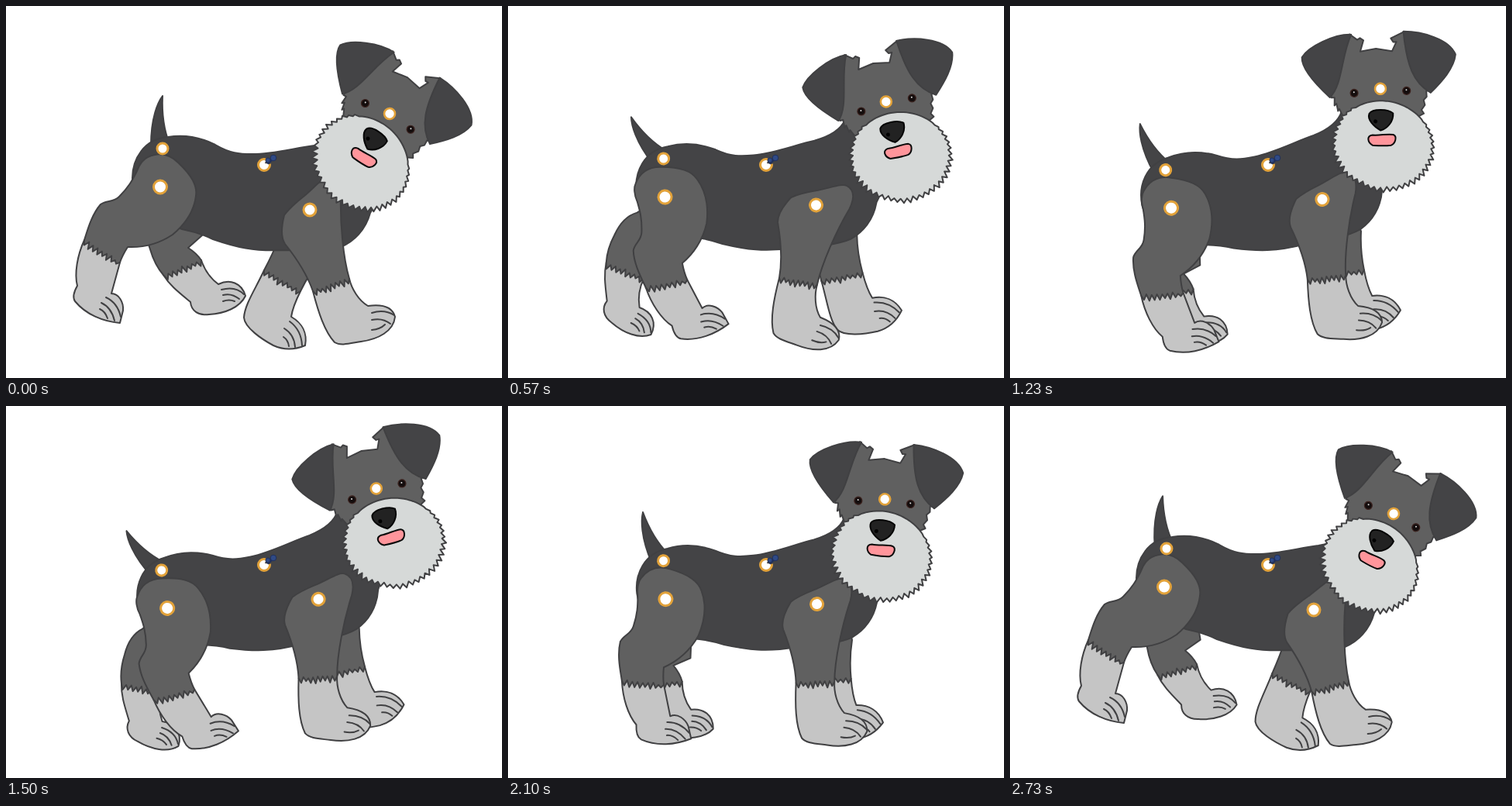
Recreate the animation shown at these times as an HTML page. Size 640 px wide and 480 px high, loop 2760 ms.

```html
<!DOCTYPE html>
<html lang="en">
<head>
<meta charset="utf-8">
<title>Walking puppet dog</title>
<style>
  html, body { margin: 0; width: 100%; height: 100%; overflow: hidden; background: #fff; }
  svg { display: block; width: 640px; height: 480px; }
  .line { stroke: #404042; stroke-width: 2; stroke-linejoin: round; stroke-linecap: round; }
  .dark { fill: #444446; }
  .coat { fill: #606060; }
  .paw { fill: #c5c5c5; }
  .beard { fill: #d6d9d8; }
  .none { fill: none; }
  .pin { fill: #fff; stroke: #e2a23a; stroke-width: 3; }
</style>
</head>
<body>
<svg viewBox="0 0 640 480">
  <g id="dog">
    <g id="hindFar"></g>
    <g id="foreFar"></g>
    <path id="tail" class="dark line" d="M202 116C196 124 187 144 187 180L198 192L211 178C203 158 201 138 202 116Z"/>
    <path class="dark line" d="M163 222C163 198 178 171 209 169C232 165 252 170 270 179C289 190 301 191 318 191C345 191 373 183 398 180C421 176 434 168 440 157L488 205C486 235 478 255 470 267C464 289 449 304 432 311C414 317 385 316 358 315C320 317 296 311 267 301Q248 292 227 288C190 275 163 250 163 222Z"/>
    <g id="hindNear"></g>
    <g id="foreNear"></g>
    <circle class="pin" cx="202" cy="184" r="7"/>
    <circle class="pin" cx="199" cy="233.5" r="8.5"/>
    <circle class="pin" cx="392" cy="263" r="8"/>
    <g id="head">
      <path class="coat line" d="M435 63L446 68L449 65L454 67L453 82L472 74L493 73L496 60L492 61L488 57L503 45L552 112L547 114L549 121L546 126L549 132L546 139L550 143L530 160L450 170L442 160L441 163L437 154L435 157L433 147L429 148L427 135Z"/>
      <path class="dark line" d="M437 63C415 67 386 90 381 105C383 118 400 132 427 148C440 128 430 94 437 63Z"/>
      <path class="dark line" d="M502 45C525 40 562 42 574 60C576 78 564 98 553 115C528 107 515 86 502 45Z"/>
      <path id="beard" class="beard line"/>
      <path d="M481 158C484 150 504 147 511 151C514 161 508 172 500 176C490 173 480 166 481 158Z" fill="#222" stroke="#050505" stroke-width="2"/>
      <circle cx="491" cy="166" r="2.5"/>
      <path d="M491 184C500 183 510 178 517 178C523 179 522 189 517 192C509 195 501 196 494 197C487 195 483 187 491 184Z" fill="#ff959b" stroke="#0a0a0a" stroke-width="2"/>
      <g fill="#140d0d" stroke="#3d2420" stroke-width="1.2">
        <circle cx="456.5" cy="136" r="5"/><circle cx="522" cy="119" r="5"/>
      </g>
      <g fill="#ddd"><circle cx="456" cy="135" r="1"/><circle cx="521.5" cy="118" r="1"/></g>
      <circle class="pin" cx="488.5" cy="123.5" r="7" style="stroke-width:2.6"/>
    </g>
  </g>
  <circle class="pin" cx="333" cy="205" r="7.5"/>
  <path d="M334 203L337 194L346 197L341 204Z" fill="#444446"/>
  <g fill="#2f4a86" stroke="#20305c">
    <path d="M337 203L345 196" stroke-width="4"/>
    <circle cx="338" cy="199" r="3"/><circle cx="345" cy="196" r="3.8"/>
  </g>
</svg>
<script>
const LOOP = 2760, STEP = 30;
const el = id => document.getElementById(id);

let seed = 7;
const random = () => (seed = (seed * 16807) % 2147483647) / 2147483647;

// Ragged fur edge between two points; teeth point towards the paw.
function furEdge([x1, y1], [x2, y2], teeth = 8) {
  const dx = x2 - x1, dy = y2 - y1, len = Math.hypot(dx, dy);
  let d = '';
  for (let i = 1; i < teeth * 2; i++) {
    const k = i / (teeth * 2), off = i % 2 ? 4 + 4 * random() : -2 + 3 * random();
    d += `L${(x1 + dx * k + dy / len * off).toFixed(1)} ${(y1 + dy * k - dx / len * off).toFixed(1)}`;
  }
  return d + `L${x2} ${y2}`;
}

// Upper curve runs left cuff -> right cuff, lower curve runs back round the paw.
function drawLeg(id, left, right, upper, lower, toes) {
  el(id).innerHTML =
    `<path class="paw line" d="M${right}${lower}"/>` +
    `<path class="none line" d="${toes}"/>` +
    `<path class="coat line" d="M${left}${upper}${furEdge(right, left)}Z"/>`;
}

drawLeg('hindNear', [101, 302], [147, 331],
  'C105 290 110 270 122 256C130 250 138 254 146 246C158 234 163 225 169 213C172 204 178 197 183 195C200 187 212 192 222 202C240 219 247 232 245 245C243 262 233 280 215 295C197 307 178 312 157 311Q150 322 147 331',
  'L136 371C146 371 152 383 151 393L147 409C125 407 103 398 89 381C85 375 88 368 92 361C88 345 92 322 101 302',
  'M129 376Q144 383 148 401M123 383Q136 389 140 406M121 391Q128 394 131 403');
drawLeg('hindFar', [203, 347], [252, 328],
  'C197 340 190 328 186 314C181 300 180 285 187 273L200 225L240 250L253 296L235 312Q246 319 252 328',
  'C256 340 262 350 274 359C289 352 304 357 309 374C302 389 282 397 262 398C248 400 239 393 238 382C221 368 211 360 203 347',
  'M278 366Q296 361 307 372M280 373Q291 370 301 378M280 381Q288 378 295 381');
drawLeg('foreNear', [396, 368], [443, 352],
  'C388 345 372 322 360 307C354 298 356 282 359 270C366 260 375 253 385 245C400 232 408 222 415 222C424 222 431 229 432 246C431 280 435 325 443 352',
  'C446 365 455 380 467 387C482 385 498 386 502 401C500 420 480 430 458 433C445 435 432 439 424 434C411 420 403 395 396 368',
  'M472 396Q488 391 501 399M472 405Q486 402 496 410M472 418Q483 417 489 411');
drawLeg('foreFar', [333, 341], [380, 368],
  'Q345 318 350 305L362 262L425 262L407 326Q391 345 380 368',
  'Q370 388 368 401C382 409 389 422 386 438C372 444 358 444 345 438C330 430 308 415 307 402C308 385 322 365 333 341',
  'M366 407Q381 418 382 438M359 416Q372 424 373 440M358 427Q364 431 365 439');

function drawBeard() {
  const count = 96, points = [];
  for (let i = 0; i < count; i++) {
    const a = i / count * 2 * Math.PI, up = Math.max(0, -Math.sin(a));
    const shag = up > 0.75 ? 0 : (i % 2 ? 3 + 3 * random() : -2 * random()) * (1 - up);
    const lean = shag > 0 ? 0.03 * Math.cos(a) : 0;
    const x = 507 + (63 + shag) * Math.cos(a + lean);
    const y = 193 + (56 + shag) * Math.sin(a + lean);
    points.push(`${x.toFixed(1)} ${y.toFixed(1)}`);
  }
  el('beard').setAttribute('d', `M${points.join('L')}Z`);
}
drawBeard();

// Each track is [time, value] pairs joined linearly; 1 is the opening pose.
const tracks = {
  sway: [[0, 0], [570, .465], [960, .825], [1180, .98], [1380, 1.02], [1500, 1], [1800, .83], [2370, .32], [2730, 0]],
  swing: [[0, 1], [525, -.07], [570, 0], [960, .92], [1000, .99], [1455, -.03], [1500, .08], [1800, .8], [1890, .98], [2340, -.05], [2370, 0], [2730, .87]],
  hind: [[0, 1], [525, -.04], [570, 0], [920, .93], [960, .83], [1450, -.03], [1500, .08], [1800, 1], [1820, 1.02], [2345, -.02], [2370, 0], [2700, 1.01], [2730, 1]],
  fore: [[0, 1], [515, 0], [570, .125], [910, .95], [960, .855], [1410, .06], [1500, .285], [1745, .99], [1800, .945], [2335, -.03], [2370, 0], [2690, .97], [2730, .905]]
};

function valueAt(track, t) {
  const next = track.findIndex(key => key[0] > t);
  if (next < 0) return track[track.length - 1][1];
  const [t0, v0] = track[next - 1], [t1, v1] = track[next];
  return v0 + (v1 - v0) * (t - t0) / (t1 - t0);
}

const turn = (id, angle, x, y) => el(id).setAttribute('transform', `rotate(${angle.toFixed(3)} ${x} ${y})`);

function render(now) {
  const t = Math.floor((now % LOOP) / STEP) * STEP;
  const swing = valueAt(tracks.swing, t);
  const hind = valueAt(tracks.hind, t);
  const fore = valueAt(tracks.fore, t);
  turn('dog', -12.1 * valueAt(tracks.sway, t), 333, 204);
  turn('tail', -32.2 * (1 - swing), 202, 184);
  turn('hindFar', 49.5 * (1 - swing), 199, 233.5);
  turn('hindNear', -37.5 * (1 - hind), 199, 233.5);
  turn('foreNear', 39.6 * (1 - fore), 392, 263);
  turn('foreFar', -40.5 * (1 - fore), 392, 263);
  el('head').setAttribute('transform',
    `translate(495 139) rotate(${(5.5 + 39 * swing).toFixed(3)}) translate(-488.5 -123.5)`);
}

const start = performance.now();
function tick() {
  render(performance.now() - start);
  requestAnimationFrame(tick);
}
tick();
</script>
</body>
</html>
```
